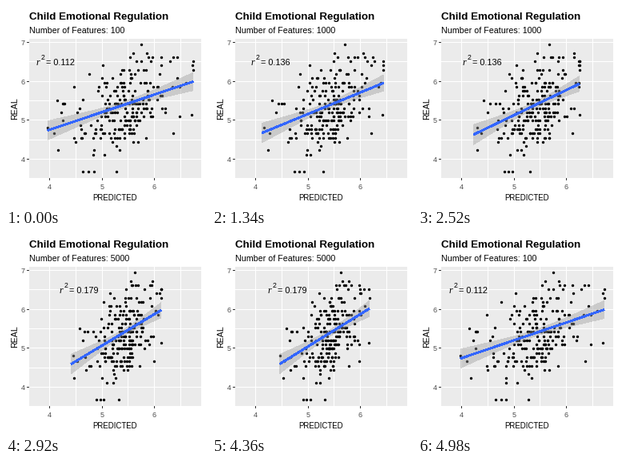
A matplotlib script that plays this animation: 250x250 px, repeating every 5000 ms.

```python
import numpy as np
import matplotlib.pyplot as plt
from matplotlib.animation import FuncAnimation
from matplotlib.patches import Polygon, Rectangle

SIZE, DPI = 250, 100
FRAMES, INTERVAL = 250, 20
HOLD, CYCLE = 42, 84
PT = 72 / DPI
SANS = "Liberation Sans"

# One entry per state; positions are in pixels
FEATURES = [100, 1000, 5000]
R2 = np.array([0.112, 0.136, 0.179])
LABEL_X = np.array([38, 55.3, 78])
LEFT = np.array([52, 69, 94])
RIGHT = np.array([234, 202, 186])
SPREAD = np.array([33, 25.6, 18])
MEAN_X, MEAN_Y, SD_Y = 146, 124, 33
TOP, LEVEL = 48, 5.3

# Extremes of the cloud: y and x in standard deviations
EXTREMES = np.array([(48, 0.7), (80, 2.67), (136, 2.6), (118, -2.5),
                     (152, -2.85), (207, -1.5), (207, -1.3),
                     (207, -1.1), (207, -0.25)])


def make_points(count=218):
    """Correlated predictions per state for scores on fixed levels."""
    rng = np.random.default_rng(5)
    score = rng.normal(size=2 * count)
    score = score[(score > -1.9) & (score < 2)][:count]
    y = MEAN_Y - SD_Y * score
    y = TOP + LEVEL * np.round((y - TOP) / LEVEL)
    shared = rng.standard_t(4, count) / 1.4
    own = rng.normal(size=(3, count))
    noise = np.clip(0.87 * shared + 0.5 * own, -2.4, 2.4)
    r2 = R2[:, None]
    z = np.sqrt(r2) * score + np.sqrt(1 - r2) * noise
    z = np.hstack([z, np.tile(EXTREMES[:, 1], (3, 1))])
    x = MEAN_X + SPREAD[:, None] * z
    x = np.clip(x, LEFT[:, None], RIGHT[:, None])
    return x, np.concatenate([y, EXTREMES[:, 0]])


def make_fit(left, right, r2, sd):
    """Rows: x, fitted y, half width of the confidence band."""
    x = np.linspace(left, right, 80)
    z = (x - MEAN_X) / sd
    return np.array([x, MEAN_Y - np.sqrt(r2) * SD_Y * z, 3.9 * np.hypot(1, z)])


POINT_X, POINT_Y = make_points()
FITS = np.array([make_fit(*args) for args in zip(LEFT, RIGHT, R2, SPREAD)])

fig = plt.figure(figsize=(SIZE / DPI, SIZE / DPI), dpi=DPI, facecolor="white")
ax = fig.add_axes([0, 0, 1, 1])
ax.set_xlim(0, SIZE)
ax.set_ylim(SIZE, 0)
ax.axis("off")


def box(x, y, w, h, color):
    ax.add_patch(Rectangle((x, y), w, h, fc=color, lw=0,
                           antialiased=False, zorder=0))


def label(x, y, text, px, **style):
    style = {"family": SANS, "color": "black", "va": "baseline", **style}
    return ax.text(x, y, text, fontsize=px * PT, **style)


def x_pixel(value):
    return int(54.4 + 65.6 * (value - 4))


def y_pixel(value):
    return int(191.6 - 48.7 * (value - 4))


# Panel, grid and axes
box(29, 41, 215, 174, "#EBEBEB")
for value in np.arange(4, 7, 0.5):
    box(x_pixel(value), 41, 1, 174, "white")
for value in np.arange(4, 7.5, 0.5):
    box(29, y_pixel(value), 215, 1, "white")
for value in (4, 5, 6):
    tx = x_pixel(value)
    box(tx, 215, 1, 3, "#333333")
    label(tx + 0.5, 229, str(value), 9, color="#4D4D4D", ha="center")
for value in (4, 5, 6, 7):
    ty = y_pixel(value)
    box(26, ty, 3, 1, "#333333")
    label(24, ty + 4, str(value), 9, color="#4D4D4D", ha="right")

label(29, 17, "Child Emotional Regulation", 13.45, weight="bold")
label(136, 243, "PREDICTED", 9.7, ha="center")
label(16, 128, "REAL", 10.6, rotation=90, ha="right", va="center")
subtitle = label(29, 34, "", 10.65)

dots = ax.scatter(POINT_X[0], POINT_Y, s=(3.4 * PT) ** 2, c="black",
                  linewidths=0, antialiased=False, zorder=2)
band = ax.add_patch(Polygon([(0, 0), (1, 1)], fc="#999999", alpha=0.4,
                            lw=0, antialiased=False, zorder=3))
line, = ax.plot([], [], color="#3366FF", lw=2 * PT, zorder=4,
                antialiased=False, solid_capstyle="butt")

# Offsets from the left edge of the moving label
stat = [
    (0, label(0, 74, "r", 12, family="Liberation Serif", style="italic", zorder=5)),
    (6, label(0, 67, "2", 8.6, zorder=5)),
    (12.3, label(0, 74, "", 10.9, zorder=5)),
]


def update(frame):
    state, step = divmod(frame, CYCLE)
    following = (state + 1) % 3
    # The last transition ends on the first frame of the next loop
    length = min(CYCLE, FRAMES + 1 - state * CYCLE) - HOLD
    t = max(0, step - HOLD + 1) / length

    def mix(values):
        return values[state] * (1 - t) + values[following] * t

    shown = following if t >= 0.5 else state
    subtitle.set_text(f"Number of Features: {FEATURES[shown]}")
    stat[2][1].set_text(f"= {R2[shown]:.3f}")
    left = mix(LABEL_X)
    for dx, part in stat:
        part.set_x(left + dx)

    dots.set_offsets(np.round(np.column_stack([mix(POINT_X), POINT_Y])))
    x, y, half = mix(FITS)
    line.set_data(x, y)
    band.set_xy(np.column_stack([np.concatenate([x, x[::-1]]),
                                 np.concatenate([y - half, (y + half)[::-1]])]))
    return [subtitle, dots, band, line, *(part for _, part in stat)]


anim = FuncAnimation(fig, update, frames=FRAMES, interval=INTERVAL,
                     repeat=True, repeat_delay=0, blit=False)
plt.show()
```
